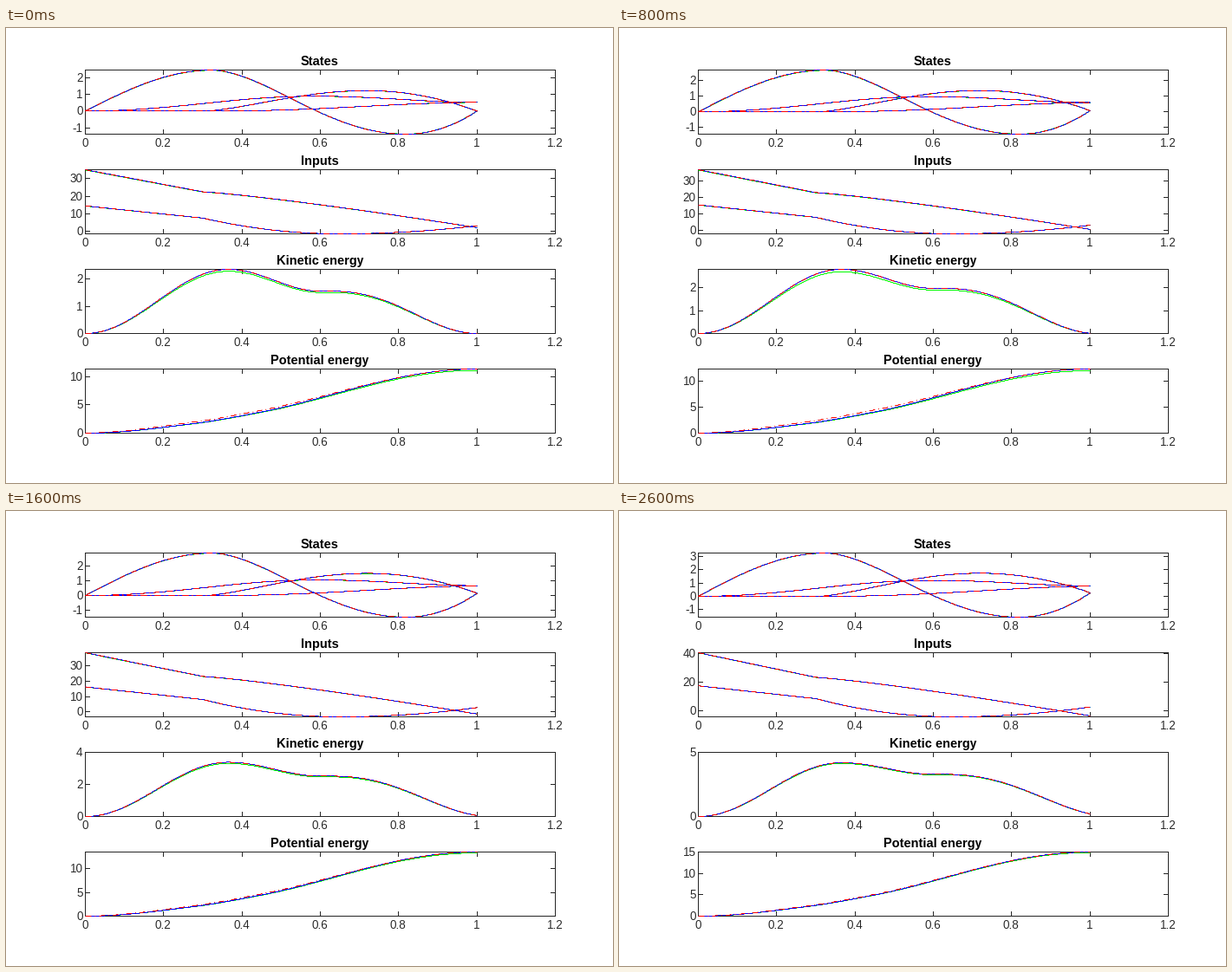
Animation, 700 px wide and 525 px high, one loop 2800 ms. Source, as a matplotlib script:

```python
import math
import numpy as np
import matplotlib.pyplot as plt
from matplotlib.animation import FuncAnimation

W, H, DPI = 700, 525, 100
PX = 72 / DPI
LEFT, RIGHT, HEIGHT = 91.5, 633.5, 74
X_MAX = 1.2
TITLES = ["States", "Inputs", "Kinetic energy", "Potential energy"]
INK = "#262626"
LAST = 25  # index of the final curve set

# One sample per pixel column keeps the thin curves crisp.
X = LEFT + np.arange(453)
T = np.minimum((X - LEFT) / (RIGHT - LEFT) * X_MAX, 1)

plt.rcParams["font.family"] = "Liberation Sans"
plt.rcParams["text.hinting"] = "native"
fig = plt.figure(figsize=(W / DPI, H / DPI), dpi=DPI, facecolor="white")
ax = fig.add_axes([0, 0, 1, 1])


def ramp(start, end):
    return np.clip((T - start) / (end - start), 0, 1)


def swell(x):
    return np.sin(np.pi / 2 * x) ** 2


def integral(y):
    return np.concatenate([[0], np.cumsum((y[1:] + y[:-1]) / 2 * np.diff(T))])


def speed1(u):
    peak, low, end = 2.45 + .79 * u, -1.38 - .18 * u, .25 * u
    return (peak * np.sin(np.pi / 2 * ramp(0, .325))
            + (low - peak) * swell(ramp(.325, .82) ** .85)
            + (end - low) * ramp(.82, 1) ** 2)


def speed2(u):
    peak, end = 1.22 + .51 * u, .27 * u
    return (peak * np.sin(np.pi / 2 * ramp(.31, .72)) ** 1.35
            + (end - peak) * ramp(.72, 1) ** 2)


def input1(u):
    start, knee, end = 35.2 + 5.2 * u, 22.5 + .8 * u, 1.9 - 5.4 * u
    return (start + (knee - start) * ramp(0, .3)
            + (end - knee) * ramp(.3, 1) ** 1.2)


def input2(u):
    start, knee, low, end = 14.4 + 3 * u, 7.4 + 1.1 * u, -1.65 - 2.5 * u, 3 - .3 * u
    return (start + (knee - start) * ramp(0, .3)
            + (low - knee) * (1 - (1 - ramp(.3, .65)) ** 2)
            + (end - low) * ramp(.65, 1) ** 2)


def kinetic(u):
    peak = 2.35 + 1.53 * u + .31 * u * u
    drop = .8 + .1 * u
    return (peak * swell(ramp(0, .365)) - drop * swell(ramp(.365, .6))
            - (peak - drop) * swell(ramp(.62, 1 + .06 * u) ** 1.2))


def potential(u):
    total = 11.33 + 3.74 * u
    return total * (.22 * swell(ramp(0, .45)) + .78 * swell(ramp(.27, 1)))


def kinetic_top(peak):
    return peak if peak < 3.2 else 4 if peak <= 4 else 5


def panels(u):
    """Curves, value limits and tick step of each panel."""
    s1, s2 = speed1(u), speed2(u)
    groups = [[s1, s2, integral(s1), integral(s2)],
              [input1(u), input2(u)], [kinetic(u)], [potential(u)]]
    limits = [[np.min(g), np.max(g)] for g in groups]
    top = limits[2][1] = kinetic_top(limits[2][1])
    steps = [1, 10 if limits[1][1] < 40 else 20,
             1 if top < 3 else 2 if top <= 4 else 5, 5]
    return zip(groups, limits, steps)


def stroke(x, y, color, dashes=None):
    line, = ax.plot(x, y, color=color, lw=PX, snap=False,
                    solid_capstyle="butt", dash_capstyle="butt")
    if dashes:
        line.set_dashes(dashes)


def segment(x0, y0, x1, y1):
    stroke([x0, x1], [y0, y1], INK)


def label(x, y, text, ha, px=13.33, color=INK, **style):
    ax.text(x, y, text, ha=ha, va="baseline", fontsize=px * PX, color=color, **style)


def center(v):
    """Centre of the pixel that holds v."""
    return np.floor(v) + .5


def draw_axes(top, title, limits, step, to_y):
    bottom = top + HEIGHT
    for y in (top, bottom):
        segment(LEFT - .5, y, RIGHT + .5, y)
    for x in (LEFT, RIGHT):
        segment(x, top, x, bottom)
    for k in range(7):
        x = center(LEFT + (RIGHT - LEFT) * k / 6)
        segment(x, bottom, x, bottom - 5.5)
        segment(x, top, x, top + 5.5)
        label(x - .5, bottom + 14.5, f"{k / 5:g}", "center")
    for k in range(math.ceil(limits[0] / step), math.floor(limits[1] / step) + 1):
        y = center(to_y(k * step))
        segment(LEFT, y, LEFT + 5.5, y)
        segment(RIGHT, y, RIGHT - 5.5, y)
        label(88.5, y + 4.5, str(k * step), "right")
    label(362, top - 5.5, title, "center", 14.67, "black", weight="bold")


def draw(frame):
    u = min(max(frame - 1, 0), LAST) / LAST
    ax.cla()
    ax.set(xlim=(0, W), ylim=(H, 0))
    ax.axis("off")

    # The approximations drift from the blue curves, most of all early on.
    gap = .03 - .0165 * u + .02 * math.exp(-((u - .36) / .12) ** 2)
    lift = 10 * gap * np.sin(np.pi * ramp(0, .8))
    for n, (curves, limits, step) in enumerate(panels(u)):
        top = 48.5 + 115 * n
        loss = gap * (.2, .2, 1, .7)[n]

        def to_y(v):
            return top + HEIGHT * (limits[1] - v) / (limits[1] - limits[0])

        draw_axes(top, TITLES[n], limits, step, to_y)
        for c in curves:
            stroke(X, center(to_y(c * (1 - loss))), "#00ff00")
        for c in curves:
            stroke(X, center(to_y(c)), "blue")
        for c in curves:
            stroke(X, center(to_y(c + lift if n == 3 else c)), "red", (7, 4, 1, 4))
    return []


anim = FuncAnimation(fig, draw, frames=28, interval=100, repeat=True, repeat_delay=0)
plt.show()
```
